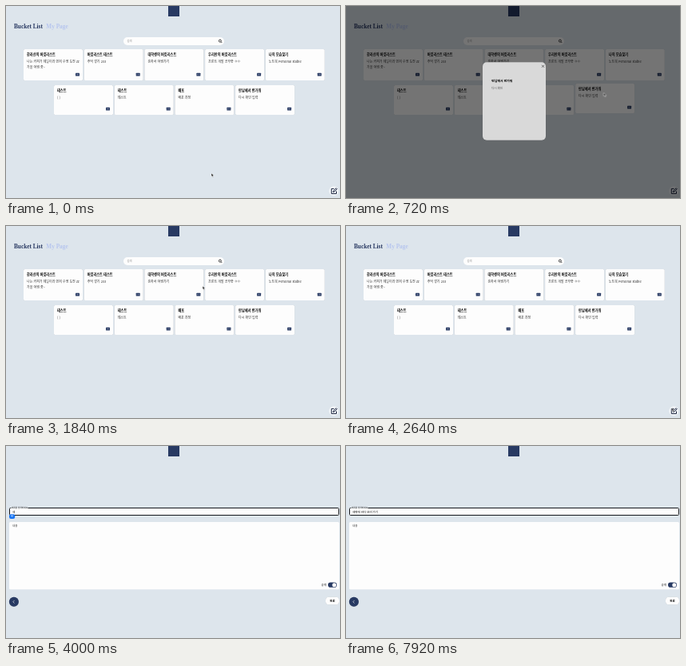
Recreate the animation shown at these times as an HTML page. Size 418x240 px, loop 8 s.

```html
<!DOCTYPE html>
<html lang="ko">
<head>
<meta charset="utf-8">
<title>Bucket List</title>
<style>
  html, body { margin: 0; width: 100%; height: 100%; overflow: hidden; background: #dde5ec; }
  svg { display: block; width: 418px; height: 240px; }
  text { font-family: "Noto Sans CJK KR", "Noto Sans CJK", "Noto Sans", sans-serif; font-size: 4px; fill: #333; white-space: pre; }
  .nav { font: bold 7.3px "Liberation Serif", serif; fill: #263660; }
  .nav.off { fill: #b6c5ee; }
  .title { font-size: 4.2px; font-weight: 900; fill: #000; }
  .form text { font-size: 3.52px; }
  .white { fill: #fdfdfd; }
  .navy { fill: #283a63; }
  .shade { filter: drop-shadow(0 .5px .7px #0004); }

  .list, .form, .modal, .lift, .label, .rest, .focus, .ime, .cursor { animation: 8s linear infinite; }
  .list { animation-name: list; }
  .form { animation-name: form; }
  .modal { animation-name: modal; }
  .lift { animation-name: lift; }
  .label { animation-name: label; }
  .rest { animation-name: rest; }
  .focus { animation-name: focus; }
  .ime { animation-name: ime; }
  .cursor { animation-name: cursor; }

  @keyframes list { 0%, 34.9% { visibility: visible; } 34.91%, 100% { visibility: hidden; } }
  @keyframes form { 0%, 34.9% { visibility: hidden; } 34.91%, 100% { visibility: visible; } }
  @keyframes modal {
    0%, 8.9% { opacity: 0; }
    8.91%, 22.9% { opacity: 1; }
    22.91%, 100% { opacity: 0; }
  }
  @keyframes lift {
    0%, 7% { transform: none; }
    8.5%, 12% { transform: translateY(-2px); }
    14%, 100% { transform: none; }
  }
  @keyframes label {
    0%, 43% { transform: translate(8px, 83.6px); fill: #555; animation-timing-function: ease-out; }
    45.5%, 100% { transform: translate(7px, 78.3px) scale(.75); fill: #111; }
  }
  @keyframes rest { 0%, 43% { opacity: 1; } 43.01%, 100% { opacity: 0; } }
  @keyframes focus { 0%, 43% { opacity: 0; } 43.01%, 100% { opacity: 1; } }
  @keyframes ime { 0%, 47.9% { opacity: 0; } 49%, 52.5% { opacity: 1; } 53.9%, 100% { opacity: 0; } }
  @keyframes cursor {
    0%, .9% { transform: translate(257px, 209px); opacity: 1; }
    2%, 4.5% { transform: translate(260px, 204px); animation-timing-function: ease-in-out; }
    8.5%, 11.5% { transform: translate(322.5px, 108.5px); animation-timing-function: ease-in-out; }
    22%, 22.9% { transform: translate(246px, 75px); animation-timing-function: ease-in-out; }
    33.5%, 35% { transform: translate(408.5px, 228px); }
    38%, 39.5% { transform: translate(330px, 192px); animation-timing-function: ease-out; }
    43%, 47.9% { transform: translate(195px, 80px); opacity: 1; }
    47.91%, 100% { transform: translate(195px, 80px); opacity: 0; }
  }
</style>
</head>
<body>
<svg viewBox="0 0 418 240">
  <rect width="418" height="240" fill="#dde5ec"/>
  <rect class="navy" x="203" y="-1" width="14" height="14"/>

  <g class="list">
    <text class="nav" x="10" y="28">Bucket List</text>
    <text class="nav off" x="50.3" y="28">My Page</text>
    <rect class="white" x="147" y="39" width="126" height="10" rx="5"/>
    <text x="151.5" y="45.3" style="font-size:3.3px;fill:#888">검색</text>
    <g fill="none" stroke="#111" stroke-width=".8">
      <circle cx="267.9" cy="43.6" r="1.5"/>
      <path d="M269 44.7l1.3 1.3"/>
    </g>
    <g id="cards"></g>
    <circle cx="410.2" cy="231.2" r="6" fill="#f2f5f8"/>
    <g fill="none" stroke="#1a243f" stroke-width="1" stroke-linejoin="round">
      <path d="M410.5 228.4h-3.2v6.2h6.2v-3"/>
      <path d="M409.4 232.6l.4-1.6 3.4-3.3 1.1 1.1-3.4 3.4z"/>
    </g>
  </g>

  <g class="modal">
    <rect width="418" height="240" opacity=".54"/>
    <rect class="shade" x="171" y="70.3" width="79" height="97.5" rx="5" fill="#d9d9d9"/>
    <path d="M245 73.8l3 3m0-3l-3 3" stroke="#222" stroke-width=".6"/>
    <text class="title" x="182.3" y="94.8" style="font-size:3.9px">만남에서 반가워</text>
    <text x="182.3" y="103.6" style="font-size:3.5px;fill:#555">다시 확인</text>
  </g>

  <g class="form">
    <rect class="white" x="4" y="77" width="413" height="10" rx="1"/>
    <rect class="rest" x="4.5" y="77.5" width="412" height="9" rx="1" fill="none" stroke="#7f888e" stroke-width=".5"/>
    <g class="focus">
      <rect x="4.5" y="77.5" width="412" height="9" rx="1" fill="none" stroke="#15181c"/>
      <rect x="6.4" y="76.9" width="21" height="1.2" fill="#eef2f5"/>
    </g>
    <text class="label">제목을 입력하세요</text>
    <text id="typed" x="8" y="83.9" style="fill:#111"></text>

    <rect class="white" x="4" y="95" width="413" height="84.3" rx="1.5"/>
    <text x="8" y="101.4">내용</text>
    <text x="394.5" y="175.4" style="fill:#111">공개</text>
    <rect class="navy" x="403" y="170.6" width="11" height="6.2" rx="3.1"/>
    <circle class="white" cx="410.8" cy="173.7" r="2.5"/>

    <g class="shade">
      <circle class="navy" cx="9.9" cy="194.8" r="6"/>
      <rect class="white" x="400" y="188.7" width="17" height="9.5" rx="4"/>
    </g>
    <path d="M10.5 193l-1.7 1.8 1.7 1.8" fill="none" stroke="#fff" stroke-width=".6"/>
    <text x="405.3" y="194.8" style="font-weight:700;fill:#111">완료</text>

    <g class="ime">
      <rect x="4" y="85.2" width="7.2" height="5.8" rx="2.2" fill="#1673f2"/>
      <text x="6" y="89.3" style="fill:#fff">한</text>
    </g>
  </g>

  <path class="cursor" d="M0 0v4.2l1-.9.8 1.7.8-.3-.8-1.6h1.4z" fill="#222" stroke="#fff" stroke-width=".45"/>
</svg>
<script>
  const PERIOD = 8000, PITCH = 75.7;

  const rows = [
    { x: 22, y: 54, h: 39, items: [
      ['한라산의 버킷리스트', '나는 커피가 제일이라 먼저 수영 도전 zz', '가을 여행 중~'],
      ['버킷리스트 테스트', '추억 쌓기 233'],
      ['대학생의 버킷리스트', '혼자서 여행가기'],
      ['우리만의 버킷리스트', '프론트 개발 공부중 ㅇㅇ'],
      ['나의 모습찾기', '노트북 Personal stable'],
    ] },
    { x: 60, y: 99, h: 37, items: [
      ['테스트', '[ ]'],
      ['테스트', '테스트'],
      ['배포', '배포 과정'],
      ['만남에서 반가워', '다시 확인 입력'],
    ] },
  ];

  function card(x, y, h, [title, ...lines], lifted) {
    const body = lines.map((line, i) =>
      `<text x="${x + 4}" y="${y + 17.3 + i * 6.7}">${line}</text>`).join('');
    const ix = x + 65, iy = y + h - 9.3;
    return `<g class="${lifted ? 'lift' : ''}">
      <rect class="white shade" x="${x}" y="${y}" width="74" height="${h}" rx="1.5"/>
      <text class="title" x="${x + 4}" y="${y + 8.4}">${title}</text>${body}
      <rect class="navy" x="${ix}" y="${iy}" width="5" height="3.8" rx=".6"/>
      <path d="M${ix + 1} ${iy + 1.9}h3" stroke="#fff" stroke-width=".6" stroke-dasharray=".6"/>
    </g>`;
  }

  document.getElementById('cards').innerHTML = rows.map(({ x, y, h, items }, r) =>
    items.map((item, i) => card(x + i * PITCH, y, h, item, r === 1 && i === 3)).join('')
  ).join('');

  // Each syllable is composed key by key, as an input method does it.
  const keys = [
    [3840, 'ㅅ'], [4000, '새'], [4480, '새ㅂ'], [4560, '새벼'], [4640, '새벽'], [4720, '새벽에'],
    [4880, '새벽에 '], [4960, '새벽에 ㅂ'], [5120, '새벽에 바'], [5360, '새벽에 바ㄷ'],
    [5520, '새벽에 바다'], [5680, '새벽에 바다 '], [5920, '새벽에 바다 ㅂ'],
    [6240, '새벽에 바다 보'], [6400, '새벽에 바다 볼'], [6560, '새벽에 바다 보'],
    [7040, '새벽에 바다 보ㄹ'], [7120, '새벽에 바다 보러'], [7520, '새벽에 바다 보러 ㄱ'],
    [7600, '새벽에 바다 보러 가'], [7760, '새벽에 바다 보러 가ㄱ'], [7840, '새벽에 바다 보러 가기'],
  ];
  const typed = document.getElementById('typed');
  let start;

  function tick(now) {
    start ??= now;
    const t = (now - start) % PERIOD;
    const text = keys.findLast(([at]) => t >= at - 4)?.[1] ?? '';
    // The caret shows only while no syllable is being composed.
    typed.textContent = text.endsWith(' ') ? text + '|' : text;
    requestAnimationFrame(tick);
  }
  requestAnimationFrame(tick);
</script>
</body>
</html>
```
